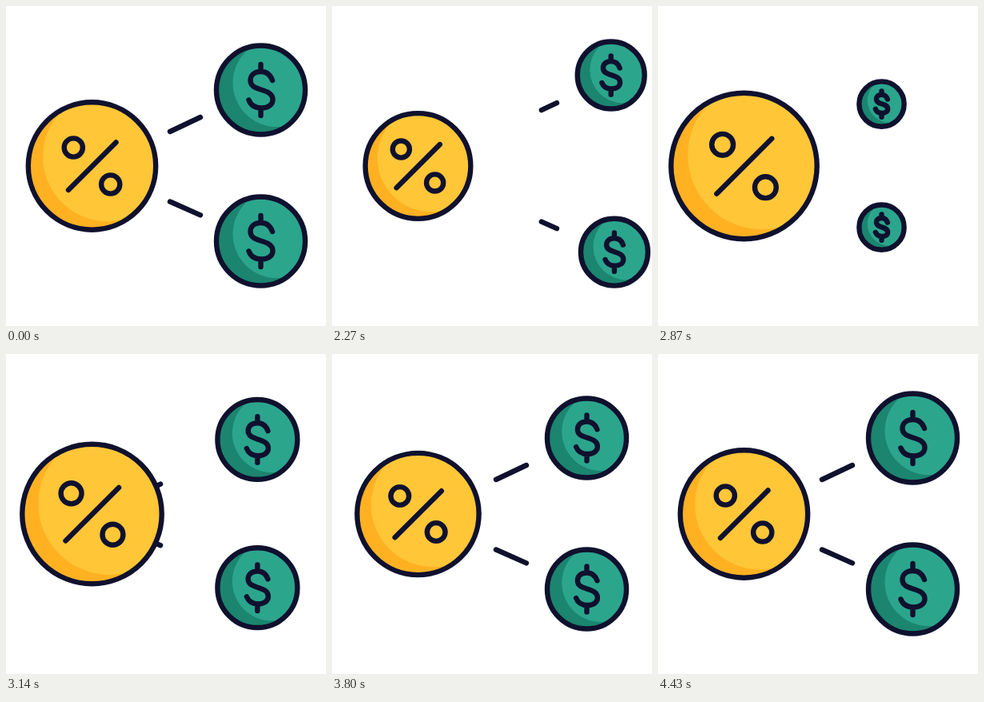
Animation of 400x400 px, one loop 4460 ms. Source, as an HTML page with a canvas:

```html
<!DOCTYPE html>
<html>
<head>
<meta charset="utf-8">
<style>
html, body { margin: 0; width: 100%; height: 100%; overflow: hidden; background: #fff; }
canvas { display: block; }
</style>
</head>
<body>
<canvas id="stage" width="400" height="400"></canvas>
<script>
const ctx = document.getElementById('stage').getContext('2d');
const LOOP = 4460, SWAP = 2570;
const NAVY = [15, 17, 46], GREEN = [44, 165, 141];
const navy = `rgb(${NAVY})`;
const HUB = { x: 107.5, y: 200 };

const clamp = u => Math.min(1, Math.max(0, u));
const span = (t, from, to) => clamp((t - from) / (to - from));
const smooth = u => u * u * (3 - 2 * u);
const lerp = (a, b, u) => a + (b - a) * u;

// Eased value through [time, value] keys
function track(t, keys) {
  let i = 1;
  while (i < keys.length - 1 && t > keys[i][0]) i++;
  const [t0, v0] = keys[i - 1], [t1, v1] = keys[i];
  return lerp(v0, v1, smooth(span(t, t0, t1)));
}

const hubKeys = [[2030, 1], [2480, .686], [2960, 1.19], [3500, .825], [3950, 1]];
const percentKeys = [[2030, 1], [2480, .84], [2960, 1.19], [3500, .915], [3950, 1]];
const leaveKeys = [[2030, 1], [2520, .5]];
const enterKeys = [[2620, .33], [3500, 1.225], [3880, .85], [4400, 1]];

const coins = [
  { x: 318.5, y: 105, dx: 72, dy: -44, fade: 2300 },
  { x: 318.5, y: 294, dx: 82, dy: 32.5, fade: 2330 }
];
const dashes = [
  { y: 157, slope: -.4735 },
  { y: 244.5, slope: .4425 }
];

function disc(x, y, r) {
  ctx.beginPath();
  ctx.arc(x, y, r, 0, Math.PI * 2);
}

function stroke(color) {
  ctx.strokeStyle = color;
  ctx.stroke();
}

// Dark disc with a shifted light disc clipped inside it
function shadedDisc(r, dark, light, sx, sy, sr) {
  disc(0, 0, r);
  ctx.fillStyle = dark;
  ctx.fill();
  ctx.save();
  ctx.clip();
  disc(sx * r, sy * r, sr * r);
  ctx.fillStyle = light;
  ctx.fill();
  ctx.restore();
  disc(0, 0, r);
  stroke(navy);
}

function dollar(s) {
  const curve = (...p) => ctx.bezierCurveTo(...p.map(v => v * s));
  ctx.beginPath();
  ctx.moveTo(14.5 * s, -12 * s);
  curve(12, -19, 7, -23, 0, -23);
  curve(-8, -23, -13, -18.5, -13, -12);
  curve(-13, -4.5, -6, -2.5, 0, -.5);
  curve(8, 2, 15, 4.5, 15, 12);
  curve(15, 18.5, 9, 22.5, 1, 22.5);
  curve(-7, 22.5, -12.5, 19, -15, 12.5);
  for (const side of [-1, 1]) {
    ctx.moveTo(0, 32 * s * side);
    ctx.lineTo(0, 23 * s * side);
  }
}

function drawCoin(coin, t) {
  const leaving = t < SWAP;
  let x, y, s, alpha = 1;
  if (leaving) {
    const u = smooth(span(t, 2030, 2570));
    x = coin.x + coin.dx * u;
    y = coin.y + coin.dy * u;
    s = track(t, leaveKeys);
    alpha = 1 - span(t, coin.fade, coin.fade + 270);
  } else {
    const u = 1 - (1 - span(t, SWAP, 3620)) ** 5;
    x = lerp(HUB.x, coin.x, u);
    y = lerp(HUB.y, coin.y, u);
    s = track(t, enterKeys);
  }
  // One-bit transparency: overlapping layers outlive single ones
  if (alpha < .29) return;
  const r = 55.5 * s;
  const weight = 1 / (2 - alpha);
  const ink = `rgb(${NAVY.map((v, i) => Math.round(lerp(GREEN[i], v, weight)))})`;
  ctx.save();
  ctx.translate(x, y);
  if (alpha >= .5) shadedDisc(r, '#1b856f', `rgb(${GREEN})`, .36, -.16, .99);
  if (alpha < 1) {
    disc(0, 0, r);
    ctx.clip();
    stroke(ink);
  }
  dollar(s);
  stroke(ink);
  ctx.restore();
}

function drawDash({ y, slope }, t) {
  let from, to;
  if (t < 2515) {
    const u = smooth(span(t, 2030, 2510));
    from = lerp(205, 318, u);
    to = lerp(243, 318.5, u);
  } else if (t >= SWAP) {
    const u = smooth(span(t, SWAP, 3540));
    from = lerp(HUB.x, 205, u);
    to = lerp(HUB.x, 243, u);
  } else return;
  ctx.beginPath();
  ctx.moveTo(from, y + (from - 205) * slope);
  ctx.lineTo(to, y + (to - 205) * slope);
  stroke(navy);
}

function drawHub(t) {
  const p = track(t, percentKeys);
  ctx.save();
  ctx.translate(HUB.x, HUB.y);
  shadedDisc(79.7 * track(t, hubKeys), '#ffb122', '#ffc637', .25, -.15, 1.02);
  ctx.beginPath();
  ctx.moveTo(-29.5 * p, 30 * p);
  ctx.lineTo(30 * p, -29.5 * p);
  stroke(navy);
  for (const side of [-1, 1]) {
    disc(23.2 * p * side, 23 * p * side, 11.6 * p);
    stroke(navy);
  }
  ctx.restore();
}

function draw(t) {
  ctx.clearRect(0, 0, 400, 400);
  ctx.lineWidth = 6.4;
  ctx.lineCap = ctx.lineJoin = 'round';
  dashes.forEach(d => drawDash(d, t));
  coins.forEach(c => drawCoin(c, t));
  drawHub(t);
}

const start = performance.now();
function tick() {
  draw((performance.now() - start) % LOOP);
  requestAnimationFrame(tick);
}
tick();
</script>
</body>
</html>
```
